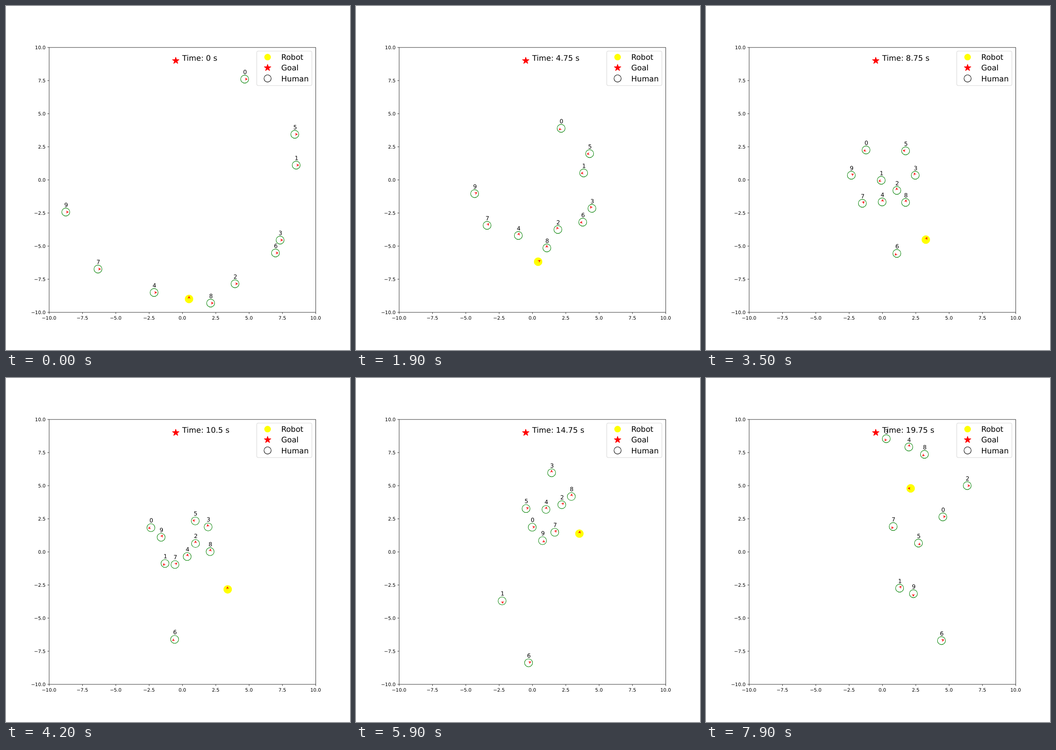
Animation of 748 by 748 pixels, one loop 8 s. Source, as an HTML page:

```html
<!DOCTYPE html>
<html lang="en">
<head>
<meta charset="utf-8">
<title>Crowd navigation</title>
<style>
  html, body { margin: 0; width: 100%; height: 100%; overflow: hidden; background: #fff; }
  svg { display: block; width: 100vw; height: 100vh; }
  text { font-family: "DejaVu Sans", Verdana, sans-serif; text-rendering: geometricPrecision; }
  .tick { font-size: 10.39px; }
  .name { font-size: 12.47px; }
  .big { font-size: 16.62px; }
  .axis { fill: none; stroke: #000; stroke-width: .8; }
  .human { fill: none; stroke: green; stroke-width: 1.04; }
  .robot { fill: #ff0; stroke: #ff0; stroke-width: 1.04; }
  .arrow { fill: none; stroke: red; stroke-width: 1.04; stroke-linecap: round; stroke-linejoin: round; }
  .star { fill: red; stroke: red; stroke-width: 1.04; stroke-linejoin: bevel; }
</style>
</head>
<body>
<svg id="stage" viewBox="0 0 748 748"></svg>
<script>
const STEP = 100, STEPS = 80;
const BEATS = [0, 8, 19, 35, 50, 67, 79];
const CENTRE = [383.35, 377.74];
const PACE = 7.22; // one plot unit per second of simulated time
const BOX = { left: 93.87, right: 673.57, top: 90.13, bottom: 666.09 };
const stage = document.getElementById("stage");

function add(parent, tag, attrs, text) {
  const el = document.createElementNS("http://www.w3.org/2000/svg", tag);
  for (const key in attrs) el.setAttribute(key, attrs[key]);
  if (text !== undefined) el.textContent = text;
  parent.appendChild(el);
  return el;
}

function star(x, y) {
  const points = [];
  for (let i = 0; i < 10; i++) {
    const r = i % 2 ? 2.98 : 7.79, a = i * Math.PI / 5;
    points.push((x + r * Math.sin(a)).toFixed(2) + "," + (y - r * Math.cos(a)).toFixed(2));
  }
  add(stage, "polygon", { class: "star", points: points.join(" ") });
}

function drawAxes() {
  const { left, right, top, bottom } = BOX;
  add(stage, "rect", { class: "axis", x: left, y: top, width: right - left, height: bottom - top });
  for (let i = 0; i <= 8; i++) {
    const label = (i * 2.5 - 10).toFixed(1).replace("-", "\u2212");
    const x = left + (right - left) * i / 8;
    const y = bottom - (bottom - top) * i / 8;
    add(stage, "path", { class: "axis", d: `M${x} ${bottom}v3.64M${left} ${y}h-3.64` });
    add(stage, "text", { class: "tick", x: x - .3, y: 681.6, "text-anchor": "middle" }, label);
    add(stage, "text", { class: "tick", x: 86.2, y: y + 3.5, "text-anchor": "end" }, label);
  }
}

function drawLegend() {
  const x = 568.8, y = 111.2, row = 23.2;
  add(stage, "rect", {
    x: 545.3, y: 98.1, width: 119.8, height: 75, rx: 3.3,
    fill: "#fff", "fill-opacity": .8, stroke: "#ccc", "stroke-opacity": .8, "stroke-width": 1.04
  });
  add(stage, "circle", { cx: x, cy: y, r: 7.1, fill: "#ff0" });
  star(x, y + row);
  add(stage, "circle", { cx: x, cy: y + 2 * row, r: 7.79, fill: "none", stroke: "#000", "stroke-width": 1.04 });
  ["Robot", "Goal", "Human"].forEach((word, i) =>
    add(stage, "text", { class: "big", x: 598.4, y: y + 5.9 + row * i }, word));
}

const minus = (a, b) => [a[0] - b[0], a[1] - b[1]];

function paced([x, y]) {
  const k = PACE / Math.hypot(x, y);
  return [x * k, y * k];
}

// Walkers pass each beat at full pace, facing along the line between its neighbours.
function velocities(points) {
  const last = points.length - 1;
  const result = points.map((p, i) =>
    paced(minus(points[Math.min(i + 1, last)], points[Math.max(i - 1, 0)])));
  // The final leg keeps turning the way it has begun to.
  const leg = minus(points[last], points[last - 1]);
  const span = BEATS[last] - BEATS[last - 1];
  result[last] = paced(leg.map((d, k) => 2 * d / span - result[last - 1][k]));
  return result;
}

function along({ points, speeds }, t) {
  let i = 0;
  while (t > BEATS[i + 1]) i++;
  const span = BEATS[i + 1] - BEATS[i];
  const u = (t - BEATS[i]) / span, v = 1 - u;
  return [0, 1].map(k =>
    v * v * (1 + 2 * u) * points[i][k] + u * u * (3 - 2 * u) * points[i + 1][k]
    + span * u * v * (v * speeds[i][k] - u * speeds[i + 1][k]));
}

const agents = [];
const bodies = add(stage, "g", {});
const labels = add(stage, "g", {});

// Everyone first walks straight from the start towards the aim, then through the stops.
function agent(name, start, stops, aim = CENTRE) {
  const isRobot = name === "";
  const [vx, vy] = paced(minus(aim, start));
  const points = [start, [start[0] + vx * BEATS[1], start[1] + vy * BEATS[1]], ...stops];
  const body = add(bodies, "g", {});
  add(body, "ellipse", { class: isRobot ? "robot" : "human", rx: 8.69, ry: 8.64 });
  const arrow = add(body, "path", { class: "arrow", d: "M2.08 0H5.45M1.29 -2.08L5.45 0L1.29 2.08" });
  const label = add(labels, "text", { class: "name" }, name);
  agents.push({ points, speeds: velocities(points), body, arrow, label, startAngle: isRobot ? -90 : 0 });
}

agent("", [398, 637], [[396, 556], [478, 508], [474, 401], [489, 283], [445, 240]], [293, 372]);
agent("0", [519, 159], [[446, 266], [348, 313], [331, 327], [430, 317], [515, 302]]);
agent("1", [631, 346], [[495, 363], [381, 379], [324, 446], [349, 495], [421, 457]]);
agent("2", [498, 604], [[439, 486], [415, 401], [423, 316], [483, 251], [568, 234]]);
agent("3", [596, 509], [[513, 440], [455, 368], [430, 271], [418, 149], [392, 132]]);
agent("4", [322, 623], [[353, 499], [383, 426], [403, 345], [422, 233], [441, 150]]);
agent("5", [628, 279], [[508, 321], [434, 315], [390, 300], [400, 300], [462, 359]]);
agent("6", [586, 537], [[493, 470], [415, 538], [338, 611], [429, 594], [512, 571]]);
agent("7", [200, 572], [[285, 477], [340, 429], [395, 377], [453, 292], [407, 323]]);
agent("8", [445, 646], [[415, 526], [434, 427], [455, 321], [478, 201], [475, 166]]);
agent("9", [130, 448], [[258, 408], [316, 368], [364, 341], [431, 385], [451, 469]]);

star(369.1, 118.9);
drawAxes();
const clock = add(stage, "text", { class: "big", x: 383.35, y: 118.5 });
drawLegend();

function show(step) {
  for (const walker of agents) {
    const [x, y] = along(walker, step);
    let angle = walker.startAngle;
    if (step > 0) {
      const [dx, dy] = minus([x, y], along(walker, step - 1));
      angle = Math.atan2(dy, dx) * 180 / Math.PI;
    }
    walker.body.setAttribute("transform", `translate(${x} ${y})`);
    walker.arrow.setAttribute("transform", `rotate(${angle})`);
    walker.label.setAttribute("x", x - 3.2);
    walker.label.setAttribute("y", y - 11.5);
  }
  const seconds = step / 4;
  const shown = step && step % 4 === 0 ? seconds.toFixed(1) : seconds;
  clock.textContent = `Time: ${shown} s`;
}

let begin = null, current = -1;
function tick(now) {
  if (begin === null) begin = now;
  const step = Math.floor(Math.max(0, now - begin) / STEP) % STEPS;
  if (step !== current) show(current = step);
  requestAnimationFrame(tick);
}
show(0);
requestAnimationFrame(tick);
</script>
</body>
</html>
```
